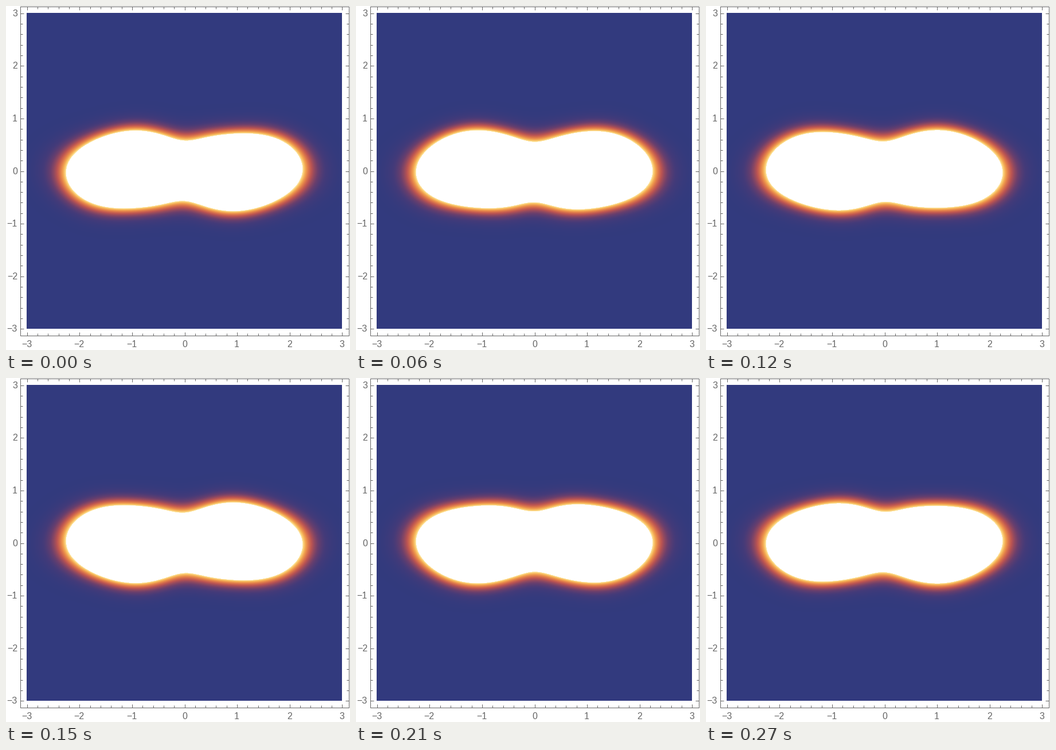
A matplotlib script that plays this animation: 600 px wide and 599 px high, repeating every 0.3 s.

```python
import numpy as np
import matplotlib.pyplot as plt
from matplotlib.animation import FuncAnimation
from matplotlib.colors import LinearSegmentedColormap

W, H, DPI = 600, 599, 100
FRAMES, INTERVAL = 10, 30
GRAY = "#666666"
UNIT = 91.6                     # pixels per axis unit
CX, CY = 311, 287               # pixel position of the origin
LEFT, RIGHT, TOP, BOTTOM = 36, 586, 12, 562
F_LEFT, F_RIGHT, F_TOP, F_BOTTOM = 24.5, 597.5, 0.5, 573.5

STOPS = [
    (0.00, (50, 58, 126)),
    (0.10, (69, 59, 121)),
    (0.22, (106, 63, 109)),
    (0.43, (187, 84, 82)),
    (0.60, (224, 123, 74)),
    (0.75, (242, 165, 80)),
    (0.90, (251, 208, 118)),
    (1.00, (255, 240, 190)),
]
cmap = LinearSegmentedColormap.from_list(
    "heat", [(v, tuple(c / 255 for c in rgb)) for v, rgb in STOPS], N=512)
cmap.set_over("white")

# Two Gaussian lobes, swayed vertically by a travelling wave
LOBE_A, LOBE_B, LOBE_H = 1.8, 5.2, 0.735
LEVEL = np.exp(-LOBE_B * LOBE_H ** 2)

x = (np.arange(LEFT, RIGHT) + 0.5 - CX) / UNIT
y = (CY - np.arange(TOP, BOTTOM) - 0.5) / UNIT
X, Y = np.meshgrid(x, y)
LOBES = np.exp(-LOBE_A * (X - 1) ** 2) + np.exp(-LOBE_A * (X + 1) ** 2)
SWAY = 0.037 - 0.012 * np.exp(-2 * X ** 2)


def density(i):
    phase = 2 * np.pi * (i - 7.55) / FRAMES
    shift = SWAY * np.cos(2.26 * X + phase)
    return LOBES * np.exp(-LOBE_B * (Y - shift) ** 2) / LEVEL


fig = plt.figure(figsize=(W / DPI, H / DPI), dpi=DPI, facecolor="white")
ax = fig.add_axes([0, 0, 1, 1])
ax.axis("off")

img = ax.imshow(density(0), cmap=cmap, vmin=0, vmax=1, aspect="auto",
                interpolation="nearest", extent=(LEFT, RIGHT, BOTTOM, TOP))
ax.set_xlim(0, W)
ax.set_ylim(H, 0)


def line(xs, ys):
    ax.plot(xs, ys, color=GRAY, lw=72 / DPI, solid_capstyle="butt")


def label(px, py, n, ha):
    text = str(n).replace("-", "\u2212")
    ax.text(px, py, text, ha=ha, va="baseline", color=GRAY,
            family="Liberation Sans", fontsize=16 * 72 / DPI)


line([F_LEFT, F_RIGHT, F_RIGHT, F_LEFT, F_LEFT],
     [F_TOP, F_TOP, F_BOTTOM, F_BOTTOM, F_TOP])

for k in range(-15, 16):
    major = k % 5 == 0
    size = 6 if major else 4
    px = np.floor(CX + k / 5 * UNIT) + 0.5
    py = np.floor(CY - k / 5 * UNIT) + 0.5
    line([px, px], [F_TOP, F_TOP + size])
    line([px, px], [F_BOTTOM, F_BOTTOM - size])
    line([F_LEFT, F_LEFT + size], [py, py])
    line([F_RIGHT, F_RIGHT - size], [py, py])
    if major:
        label(px, 594, k // 5, "center")
        label(20, py + 5.5, k // 5, "right")


def update(i):
    img.set_data(density(i))
    return [img]


anim = FuncAnimation(fig, update, frames=FRAMES, interval=INTERVAL,
                     repeat=True, repeat_delay=0, blit=False)
plt.show()
```
